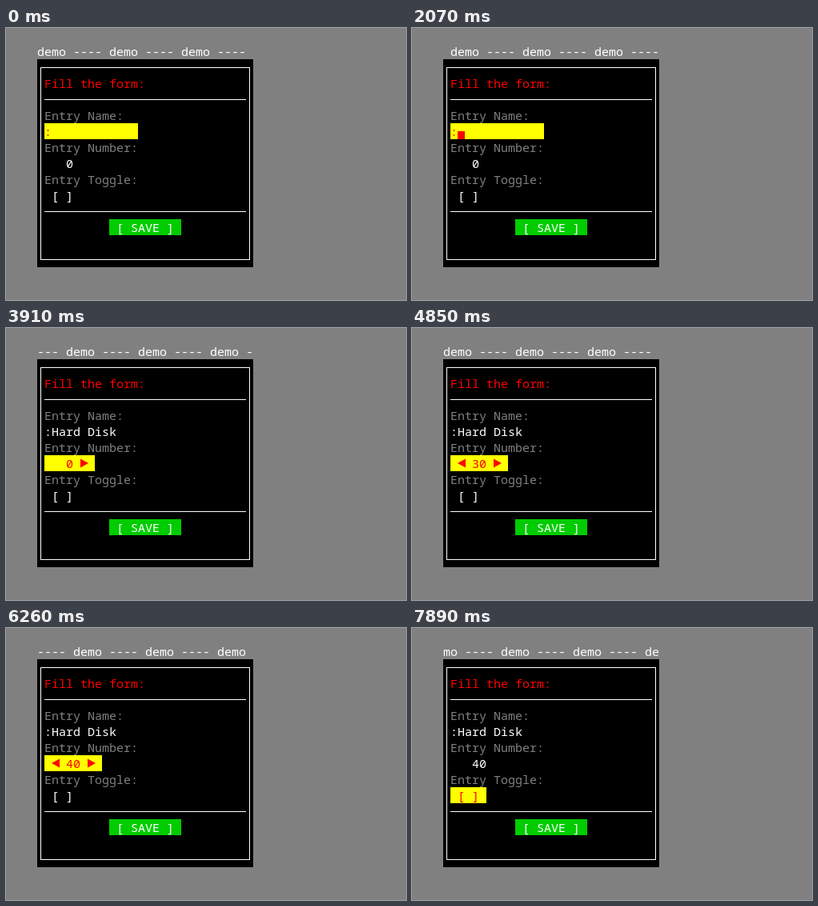
Write an HTML page that moves like this. It is 500 by 340 pixels and loops after 8000 ms.

```html
<!DOCTYPE html>
<html lang="en">
<head>
<meta charset="utf-8">
<title>Terminal form</title>
<style>
  html, body { margin: 0; width: 100%; height: 100%; overflow: hidden; background: #808080; }
  svg { display: block; }
  text { font: 15px "Noto Sans Mono", "DejaVu Sans Mono", monospace; white-space: pre; fill: #fff; }
  rect, line { shape-rendering: crispEdges; }
  .frame { fill: none; stroke: #fff; }
  .label { fill: #808080; }
  .red { fill: #f00; }
  .field { fill: #ff0; }
</style>
</head>
<body>
<svg id="stage" width="500" height="340" viewBox="0 0 500 340"></svg>
<script>
const LOOP = 8000, CELL = 9, ROW = 20, LEFT = 48;
const MARQUEE = "demo ---- ".repeat(4);
const NAME = "Hard Disk";

// Event times in ms
const scrollTicks = [
  70, 380, 610, 840, 1070, 1380, 1610, 1840, 2070, 2300, 2530, 2840, 3070, 3380, 3610, 3910,
  4140, 4370, 4600, 4850, 5080, 5390, 5620, 5850, 6180, 6410, 6640, 6870, 7190, 7420, 7660, 7890
];
const keyTimes = [2380, 2460, 2610, 2760, 2840, 3070, 3150, 3220, 3380];
const upTimes = [4290, 4450, 4680, 4920, 5230, 5700, 5850];
const downTimes = [6010, 6100, 6260];
const toggleTimes = [7340, 7660];
const NUMBER_FOCUS = 3760, TOGGLE_FOCUS = 6490;

// The screen is refreshed on a coarse clock, the cursor blinks on its own
const REFRESH = 76.7, BLINK = 195, BLINK_START = 115;

const stage = document.getElementById("stage");

function add(tag, attrs, content = "") {
  const node = document.createElementNS("http://www.w3.org/2000/svg", tag);
  set(node, attrs);
  node.textContent = content;
  return stage.appendChild(node);
}

function set(node, attrs) {
  for (const key in attrs) node.setAttribute(key, attrs[key]);
}

const rowTop = row => 19 + ROW * row;
const box = (x, row, cells, cls) =>
  add("rect", { x, y: rowTop(row), width: cells * CELL, height: ROW, class: cls });
const write = (x, row, content, cls = "") =>
  add("text", { x, y: rowTop(row) + 16, class: cls }, content);
const rule = row =>
  add("line", { x1: LEFT, x2: 300, y1: rowTop(row) + 10.5, y2: rowTop(row) + 10.5, stroke: "#fff" });
const show = (node, on) => set(node, { visibility: on ? "visible" : "hidden" });

const marquee = write(39, 0, "");
add("rect", { x: 39, y: 39, width: 270, height: 260 });
add("rect", { x: 43.5, y: 49.5, width: 261, height: 240, class: "frame" });
write(LEFT, 2, "Fill the form:", "red");
rule(3);
write(LEFT, 4, "Entry Name:", "label");
write(LEFT, 6, "Entry Number:", "label");
write(LEFT, 8, "Entry Toggle:", "label");
rule(10);
box(129, 11, 10, "").style.fill = "#0c0";
write(138, 11, "[ SAVE ]");

const nameField = box(LEFT, 5, 13, "field");
const numberField = box(LEFT, 7, 7, "field");
const toggleField = box(LEFT, 9, 5, "field");
const nameText = write(LEFT, 5, "");
const numberText = write(LEFT + 3 * CELL, 7, "");
const toggleText = write(LEFT + CELL, 9, "");
const cursor = add("rect", { y: 129, width: CELL, height: 10, class: "red" });
const lessArrow = add("path", { d: "M67 163.5V174.5L57 169Z", class: "red" });
const moreArrow = add("path", { d: "M0 163.5V174.5L10 169Z", class: "red" });

const countPast = (times, t) => times.filter(time => time <= t).length;

function cursorOn(t) {
  const refreshed = Math.floor((t + 8) / REFRESH) * REFRESH;
  return Math.floor((refreshed - BLINK_START) / BLINK) % 2 === 0 && refreshed >= BLINK_START;
}

function setField(field, label, content, focused) {
  show(field, focused);
  label.textContent = content;
  set(label, { class: focused ? "red" : "" });
}

function render(t) {
  const offset = countPast(scrollTicks, t) % 10;
  marquee.textContent = MARQUEE.slice(offset, offset + 30);

  const typed = countPast(keyTimes, t);
  const onName = t < NUMBER_FOCUS;
  setField(nameField, nameText, ":" + NAME.slice(0, typed), onName);
  set(cursor, { x: LEFT + (typed + 1) * CELL });
  show(cursor, onName && cursorOn(t));

  const value = 10 * (countPast(upTimes, t) - countPast(downTimes, t));
  const digits = String(value).length;
  const onNumber = !onName && t < TOGGLE_FOCUS;
  setField(numberField, numberText, value, onNumber);
  set(numberField, { width: (digits + 6) * CELL });
  set(moreArrow, { transform: `translate(${LEFT + (digits + 4) * CELL} 0)` });
  show(moreArrow, onNumber);
  show(lessArrow, onNumber && value > 0);

  const checked = countPast(toggleTimes, t) % 2;
  setField(toggleField, toggleText, checked ? "[X]" : "[ ]", t >= TOGGLE_FOCUS);
}

function tick() {
  render(performance.now() % LOOP);
  requestAnimationFrame(tick);
}
tick();
</script>
</body>
</html>
```
